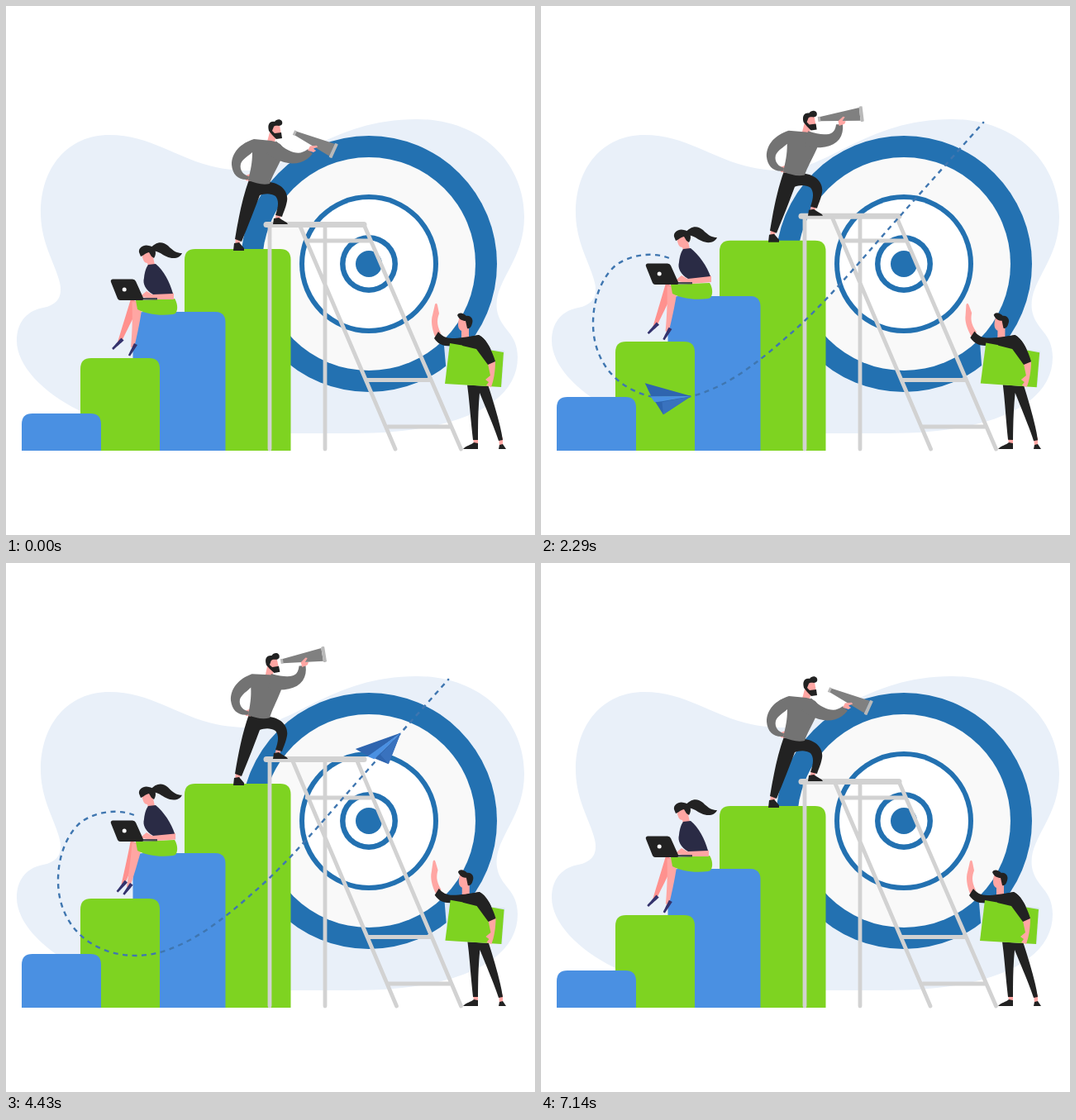
Write an HTML page that moves like this. It is 640 by 640 pixels and loops after 7.21 s.

```html
<!DOCTYPE html>
<html lang="en">
<head>
<meta charset="utf-8">
<title>Growth chart</title>
<style>
html, body { margin: 0; width: 100%; height: 100%; overflow: hidden; background: #fff; }
svg { display: block; width: 100%; height: 100%; }
.blue { fill: #4a90e2; } .green { fill: #7ed321; } .black { fill: #222; }
.gray { fill: #737373; } .skin { fill: #ffa6a3; } .skin2 { fill: #ff918e; } .navy { fill: #2a2b45; }
.shoe { fill: #34336d; } .ring { fill: #2371b1; }
.ladder { fill: none; stroke: #d2d2d2; stroke-width: 4.8; stroke-linecap: round; }
</style>
</head>
<body>
<svg viewBox="0 0 640 640">
  <defs>
    <path id="route" d="M155 305C138 298 110 299 90 314C72 330 63 357 63 384C63 440 105 475 157 475C210 475 262 432 300 398C345 360 400 292 438 250L536 140"/>
    <mask id="reveal" maskUnits="userSpaceOnUse" x="0" y="0" width="640" height="640">
      <use href="#route" id="wipe" fill="none" stroke="#fff" stroke-width="8"/>
    </mask>
  </defs>

  <path fill="#e9f0f9" d="M42 250C42 195 75 156 125 156C185 156 215 196 285 199C345 202 390 137 497 137C575 137 627 190 627 255C627 310 589 333 594 368C598 392 619 395 619 425C619 482 545 517 420 517C300 517 150 520 88 489C45 468 13 435 13 405C13 380 28 368 45 365C66 361 69 347 64 331C58 309 42 285 42 250Z"/>

  <g class="ring">
    <circle cx="439" cy="312" r="155"/>
    <circle cx="439" cy="312" r="129" fill="#f9f9f9"/>
    <circle cx="439" cy="312" r="84"/>
    <circle cx="439" cy="312" r="78" fill="#fff"/>
    <circle cx="439" cy="312" r="35"/>
    <circle cx="439" cy="312" r="28.5" fill="#fff"/>
    <circle cx="439" cy="312" r="16"/>
  </g>

  <path id="bar4" class="green"/>
  <path id="bar3" class="blue"/>
  <path id="bar2" class="green"/>
  <path id="bar1" class="blue"/>

  <path id="frame" class="ladder"/>
  <path id="step" class="ladder" stroke-width="7" style="stroke-width:7"/>

  <g id="climber">
    <path class="skin" d="M278 280H285L282 290H277ZM327 252H333L331 259H325Z"/>
    <path class="black" d="M294 210L318 213C332 214 342 224 340 236C338 246 335 251 334 255L326 253C329 244 331 236 326 230C320 226 312 227 307 229C300 248 292 268 285 285L277 282C281 258 286 232 294 210ZM276 287L282 286L288 293V296H275ZM324 257L330 256C335 260 340 261 341 264H323Z"/>
    <g id="lean">
      <path class="skin" d="M316 164L320 149L328 152L325 165ZM321 144H331L333 156L324 158ZM290 205L296 203V212L290 211Z"/>
      <path class="black" d="M318 151C316 143 319 139 325 140C328 135 336 137 334 143C331 147 327 143 324 146L322 151L325 154L333 153L334 160L327 161L322 156Z"/>
      <path class="gray" d="M300 161L321 163C332 165 339 170 334 183C328 196 322 206 319 215C310 217 302 214 293 211C296 198 298 190 298 177C294 181 286 185 284 191C282 199 288 205 294 206L293 210C281 211 274 204 273 192C273 177 284 166 300 161Z"/>
      <g id="glass">
        <path fill="#808080" d="M2-2.5L51-8V8L2 2.5Z"/>
        <path fill="#b9b9b9" d="M0-3H3V3H0ZM51-9Q53-10 55-9V9Q53 10 51 9Z"/>
      </g>
      <path id="sleeve" class="gray"/>
      <path id="grip" class="skin" d="M-4 5L-4-1L3-5L5-4L1 0L5 1L3 4Z"/>
    </g>
  </g>

  <g id="girl">
    <path id="farLeg" class="skin2"/><path id="farShoe" class="shoe"/>
    <path id="nearLeg" class="skin"/><path id="nearShoe" class="shoe"/>
    <path class="green" d="M157 356L204 354C209 362 208 373 202 373C186 375 170 373 159 367Z"/>
    <path id="pony" class="black" d="M174 294C181 285 189 284 196 290C203 297 207 299 213 299C211 305 202 307 194 303C187 300 183 295 176 297Z"/>
    <path class="skin" d="M164 297L176 295L180 313L172 315L171 311C167 311 165 307 164 297Z"/>
    <path class="black" d="M161 298C160 292 167 288 173 290C181 291 183 299 179 305L176 303L173 298C168 299 165 303 163 303Z"/>
    <path id="arm" class="skin"/>
    <path id="top" class="navy"/>
    <path fill="#4b4a55" d="M142 353H183V355.5H142Z"/>
    <path class="black" d="M129 330.500H153Q156 330.500 157 333L166 353Q167 356 164 356H138Q136 356 135 354L127 334Q126 331 129 330.500Z"/>
    <circle cx="143.200" cy="343" r="2.500" fill="#fff"/>
  </g>

  <path class="skin" d="M565 522H571V530H566ZM596 522H601V532H597Z"/>
  <path class="black" d="M571 529V536H553C556 532 563 531 566 528ZM597 531L601 530L605 536H596Z"/>
  <g id="carrier">
    <path class="black" d="M558 458H583C590 480 598 505 601 525L596 526C590 508 580 485 573 468C571 490 571 510 571 525L565 525C562 500 561 480 558 458Z"/>
    <path id="wave" class="skin" d="M519 400C515 390 514 380 516 374L519 361Q521 358 522 362L524 372C522 378 520 384 526 396Z"/>
    <path class="skin" d="M548 378L558 380L560 391V401L551 402V393C547 391 546 387 548 378Z"/>
    <path class="black" d="M546 374C548 370 553 371 557 375C562 374 566 379 564 384C563 389 560 391 558 390L556 381C552 381 548 379 546 374ZM523 394L518 402C524 411 532 412 540 411L568 418L590 425C586 412 580 402 572 398C560 400 548 402 540 402C532 402 527 399 523 394Z"/>
    <path fill="#dce6f5" d="M530 411L603 417L600 461L534 457Z"/>
    <path class="green" d="M537 408L602 419L599 461L531 457Z"/>
    <path class="skin" d="M583 433L592 429C592 442 590 453 587 461L581 459L584 455L580 452L586 447Z"/>
    <path class="black" d="M552 402L572 398C580 402 588 416 592 430L583 434L569 415L552 411Z"/>
  </g>

  <use href="#route" fill="none" stroke="#3f76b0" stroke-width="2.400" stroke-dasharray="6 5.500" mask="url(#reveal)"/>
  <g id="plane">
    <path fill="#2f65af" d="M0 0L-51-28L-47-10ZM0 0L-44-3L-38 14Z"/>
    <path fill="#3972be" d="M0 0L-36-1L-38 14Z"/>
    <path class="blue" d="M0 0L-48-11L-45-3L-36-2Z"/>
  </g>
</svg>
<script>
const LOOP = 7.21;
const el = id => document.getElementById(id);
const put = (id, name, value) => el(id).setAttribute(name, value);
const mix = (a, b, k) => a + (b - a) * k;
const mixPt = (a, b, k) => [mix(a[0], b[0], k), mix(a[1], b[1], k)];
const clamp = x => Math.min(1, Math.max(0, x));
const ease = (t, from, len) => { const k = clamp((t - from) / len); return k * k * (3 - 2 * k); };
const pulse = (t, up, upLen, down, downLen) => ease(t, up, upLen) - ease(t, down, downLen);

// Interpolates [time, value] pairs.
function track(t, keys, curve = ease) {
  let i = 1;
  while (i < keys.length - 1 && t > keys[i][0]) i++;
  const [a, b] = [keys[i - 1], keys[i]];
  return mix(a[1], b[1], curve(t, a[0], b[0] - a[0]));
}
const linear = (t, from, len) => clamp((t - from) / len);

// Outline of a quadratic curve whose width runs from w0 to w1.
function taper(a, c, b, w0, w1) {
  const left = [], right = [];
  for (let i = 0; i <= 12; i++) {
    const k = i / 12, p = mixPt(mixPt(a, c, k), mixPt(c, b, k), k);
    const dx = mix(c[0] - a[0], b[0] - c[0], k), dy = mix(c[1] - a[1], b[1] - c[1], k);
    const w = mix(w0, w1, k) / 2 / (Math.hypot(dx, dy) || 1);
    left.push([p[0] - dy * w, p[1] + dx * w]);
    right.unshift([p[0] + dy * w, p[1] - dx * w]);
  }
  return 'M' + left.concat(right).map(p => p.map(v => v.toFixed(2)).join(' ')).join('L') + 'Z';
}

const bars = [
  { x: 19, w: 96, y: 493, rise: 20, up: 0.2, down: 6.33 },
  { x: 90, w: 96, y: 426, rise: 20, up: 0.78, down: 5.9 },
  { x: 153.5, w: 112, y: 370, rise: 19, up: 1.37, down: 5.44 },
  { x: 216, w: 128.5, y: 294, rise: 27, up: 1.954, down: 5.17 }
];
const barPath = (x, y, w, r = 13) =>
  `M${x} 538V${y + r}Q${x} ${y} ${x + r} ${y}H${x + w - r}Q${x + w} ${y} ${x + w} ${y + r}V538Z`;

const route = el('route');
const total = route.getTotalLength();
const flight = [[0.8, 0], [1.21, 87], [2.29, 317], [3.64, 571], [4.43, 720], [4.9, 808]];
const leanKeys = [[0, 0], [0.2, 0], [1.2, 1], [2.2, 0.05], [3.6, 0], [4.3, 0.4], [5.1, 0], [6.35, 1], [7.08, 0]];

function drawLadder(lift) {
  const y = 264.5 - lift, k = lift / 27;
  const a = mix(355, 346, k), b = mix(433, 424, k), foot = mix(471, 472.5, k);
  put('step', 'd', `M315 ${y}H433`);
  put('frame', 'd', `M319 ${y}V536M386 ${y}V536M${a} ${y}L${foot} 536M${b} ${y}L550.500 536` +
    'M364 284H441M437 452.500H514M462 509H538');
}

function drawClimber(t, lift) {
  const raise = pulse(t, 0.05, 0.85, 6.4, 0.7);
  const hand = mixPt([371, 172], [364, 150], raise);
  const eye = mixPt([348, 153], [335.5, 147.5], raise);
  put('climber', 'transform', `translate(0 ${-lift})`);
  put('lean', 'transform', `rotate(${-7.5 * track(t, leanKeys)} 305 213)`);
  put('glass', 'transform', `translate(${eye}) rotate(${mix(24.5, -6.5, raise)})`);
  put('grip', 'transform', `translate(${hand}) rotate(${mix(25, -12, raise)})`);
  put('sleeve', 'd', taper([321, 171], mixPt([350, 194], [361, 181], raise),
    mixPt([368, 176], [361.5, 154], raise), 19, 8));
}

function drawLeg(name, knee, ankle, toe) {
  const heel = [ankle[0] + 5, ankle[1] - 1], tip = [heel[0] + toe[0], heel[1] + toe[1]];
  const calf = [mix(knee[0], ankle[0], 0.6) + 3, mix(knee[1], ankle[1], 0.5)];
  put(name + 'Leg', 'd', taper(knee, calf, [ankle[0] + 1, ankle[1] + 3], 13, 4));
  put(name + 'Shoe', 'd', taper(heel, mixPt(heel, tip, 0.5), tip, 4.5, 2.5));
}

function drawGirl(t, lift) {
  const swing = (1 - Math.cos(t / LOOP * 6 * Math.PI)) / 2;
  const reach = clamp(1.6 * (1 - Math.cos(t / LOOP * 4 * Math.PI)) / 2);
  const x = 202 + 3 * reach, y = 348 - 2 * reach;
  put('girl', 'transform', `translate(0 ${-lift})`);
  put('pony', 'transform', `rotate(${5 * swing} 176 294)`);
  drawLeg('far', [157, 357], mixPt([136, 404], [156, 409], swing), mixPt([-12, 12], [-7, 15], swing));
  drawLeg('near', [159, 358], mixPt([152, 410], [129, 402], swing), mixPt([-8, 14], [-15, 9], swing));
  put('top', 'd', `M172 313L181 312C191 320 ${x - 4} 334 ${x} ${y}L178 349C169 344 165 336 167 329C168 320 170 316 172 313Z`);
  put('arm', 'd', `M${x - 2} ${y - 2}L${x + 1} ${y}V${y + 7}L182 355L165 352L164 350L170 345L177 349Z`);
}

function drawCarrier(t) {
  const sway = (1 - Math.cos(t / LOOP * 4 * Math.PI)) / 2;
  put('carrier', 'transform', `rotate(${0.75 * sway} 580 528)`);
  put('wave', 'transform', `rotate(${-12 * sway} 521 398)`);
}

function drawPlane(t) {
  const s = track(t, flight, linear) / 808 * total;
  const p = route.getPointAtLength(s);
  const a = route.getPointAtLength(Math.max(0, s - 2)), b = route.getPointAtLength(Math.min(total, s + 2));
  const turn = Math.atan2(b.y - a.y, b.x - a.x) * 180 / Math.PI;
  put('plane', 'transform', `translate(${p.x} ${p.y}) rotate(${turn})`);
  put('plane', 'opacity', pulse(t, 0.8, 0.2, 4.7, 0.2));
}

function render(t) {
  const lifts = bars.map((b, i) => {
    const lift = b.rise * pulse(t, b.up, 0.8, b.down, 0.8);
    put('bar' + (i + 1), 'd', barPath(b.x, b.y - lift, b.w));
    return lift;
  });
  const shown = pulse(t, 0.1, 0.85, 5.55, 0.8) * total;
  put('wipe', 'stroke-dasharray', `${shown} ${total + 10}`);
  put('wipe', 'visibility', shown > 0.1 ? 'visible' : 'hidden');
  drawLadder(lifts[3]);
  drawClimber(t, lifts[3]);
  drawGirl(t, lifts[2]);
  drawCarrier(t);
  drawPlane(t);
}

const start = performance.now();
function tick() {
  render((performance.now() - start) / 1000 % LOOP);
  requestAnimationFrame(tick);
}
tick();
</script>
</body>
</html>
```
